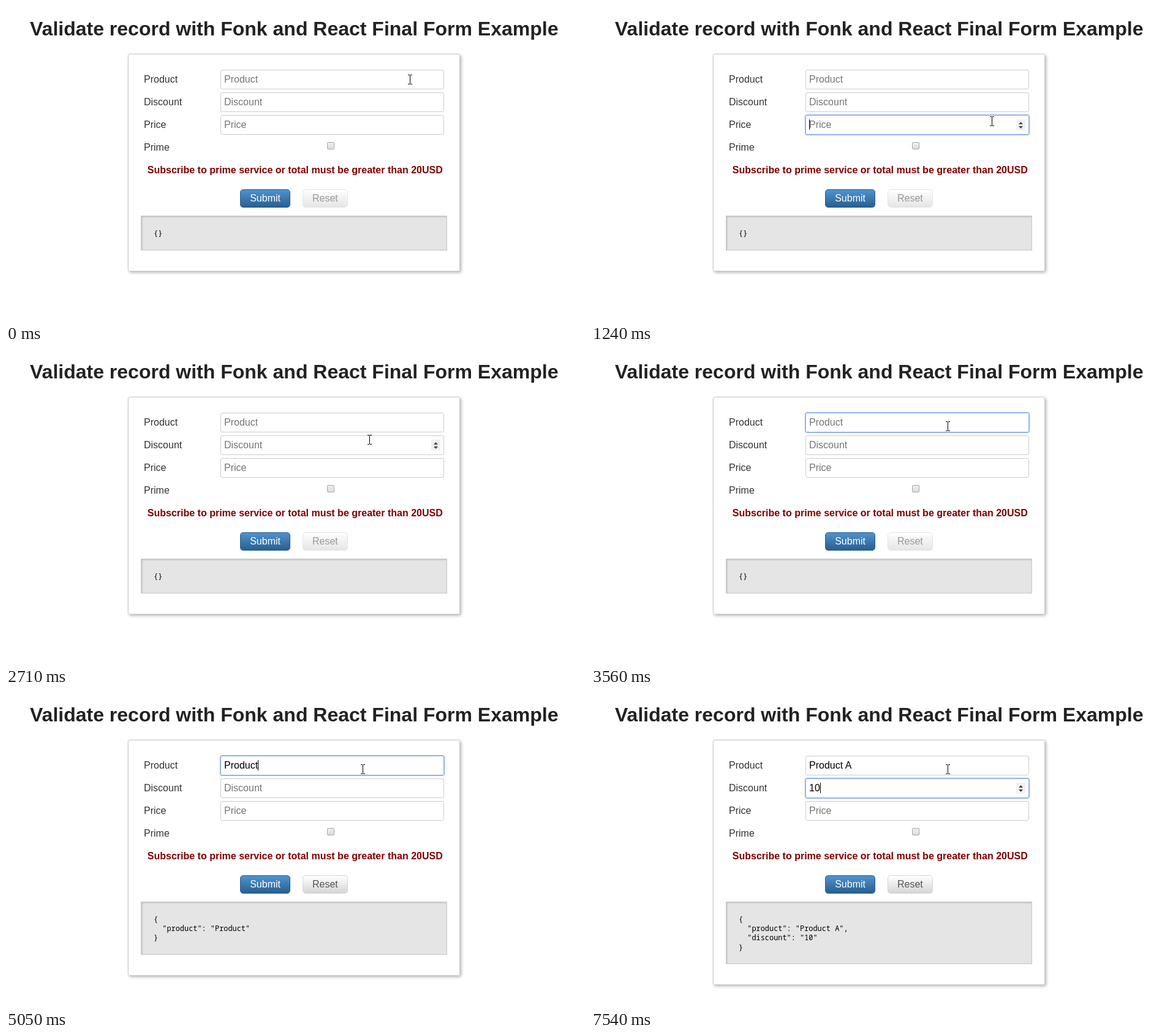
These frames come from a looping animation (945x514 px, 8000 ms). An HTML page:

```html
<!DOCTYPE html>
<html lang="en">
<head>
<meta charset="utf-8">
<title>Form validation</title>
<style>
  html, body { margin: 0; width: 100%; height: 100%; overflow: hidden; background: #fff; }
  body { position: relative; font: 16px/17px "Liberation Sans", Arial, sans-serif; color: #222; }
  body > * { position: absolute; box-sizing: border-box; margin: 0; white-space: pre; }
  h1 { left: 39px; top: 19px; font-size: 32px; line-height: 36px; }
  .form {
    left: 199px; top: 78px; width: 542px; padding: 263px 20px 33px;
    border: 1px solid #ccc; border-radius: 3px; box-shadow: 2px 2px 5px rgba(0,0,0,.3);
  }
  pre {
    margin: 0; padding: 19.9px 20px 19.7px; border: 1px solid #ccc;
    background: #e5e5e5; box-shadow: inset 1px 1px 3px rgba(0,0,0,.2);
    font: 11.92px/15.2px "Noto Sans Mono", monospace; color: #000;
  }
  .label { left: 225px; color: #333; }
  .field {
    left: 350px; width: 365px; height: 32px; padding: 6px 5px;
    border: 1px solid #ccc; border-radius: 3px; color: #000;
  }
  .field.focus { border-color: #98b8f0; box-shadow: 0 0 0 1px #87adec; }
  .field span { color: #757575; }
  .field i { position: absolute; top: 6px; width: 1px; height: 17px; background: #000; }
  .field svg { position: absolute; left: 343px; top: 6px; background: #f0f0f0; display: none; }
  .field.spin svg { display: block; }
  .check {
    left: 524px; top: 222px; width: 12px; height: 12px;
    border: 1px solid #a6a6a6; border-radius: 2px; background: linear-gradient(#eee, #dcdcdc);
  }
  .error { left: 230.8px; top: 259px; font-weight: bold; color: #800000; }
  .btn { top: 299px; height: 30px; padding: 5px 15px; border: 1px solid; border-radius: 5px; }
  .submit { left: 382.2px; color: #fff; border-color: #285f8f; background: linear-gradient(#4f93ce, #285f8f); }
  .reset { left: 484px; color: #555; border-color: #d5d5d5; background: linear-gradient(#fff, #d5d5d5); }
  #cursor { left: 0; top: 0; overflow: visible; }
</style>
</head>
<body>
<h1>Validate record with Fonk and React Final Form Example</h1>
<div class="form"><pre></pre></div>
<div class="check"></div>
<div class="error">Subscribe to prime service or total must be greater than 20USD</div>
<div class="btn submit">Submit</div>
<div class="btn reset">Reset</div>
<svg id="cursor" width="1" height="1" shape-rendering="crispEdges">
  <path d="M-3-8h3v1h-3z M1-8h3v1h-3z M0-7h1v14h-1z M-3 7h3v1h-3z M1 7h3v1h-3z"/>
</svg>
<script>
const LOOP = 8000, TICK = 77, BLINK = 460;
const $ = s => document.querySelector(s);
const names = ['Product', 'Discount', 'Price', 'Prime'];
const rowTop = row => 104 + 37 * row;

const arrows = '<svg width="15" height="18"><path fill="#444" d="M4 8l3.5-4L11 8zM4 11h7l-3.5 4z"/></svg>';
const cursor = $('#cursor');
const fields = [];
names.forEach((name, row) => {
  const add = (cls, top, html) => {
    const el = document.createElement('div');
    el.className = cls;
    el.style.top = top + 'px';
    el.innerHTML = html;
    document.body.insertBefore(el, cursor);
    return el;
  };
  add('label', rowTop(row) + 7, name);
  if (row < 3) {
    const el = add('field', rowTop(row), '<b style="font-weight:normal"></b>' + (row ? arrows : ''));
    fields.push({ el, text: el.firstChild });
  }
});

// Pointer moves, taken in even steps, one per TICK
const moves = [
  { start: 310, steps: 5, x: 656, y: 160 },
  { start: 930, steps: 3, x: 654, y: 188 },
  { start: 1320, steps: 7, x: 627, y: 269 },
  { start: 2400, steps: 5, x: 593, y: 148 },
  { start: 2785, steps: 3, x: 582, y: 126 }
];
// [time, focused row]
const focus = [[0, -1], [310, 0], [780, 1], [1240, 2], [1790, -1], [3030, 0], [6360, 1]];
// Bursts of evenly spaced keystrokes
const bursts = [
  { start: 4040, gap: 168, row: 0, text: 'Product' },
  { start: 5280, gap: 380, row: 0, text: ' A' },
  { start: 7140, gap: 400, row: 1, text: '10' }
];

function pointer(t) {
  let x = 659, y = 120;
  for (const m of moves) {
    if (t < m.start) break;
    const p = Math.min(1, (Math.floor((t - m.start) / TICK) + 1) / m.steps);
    x += (m.x - x) * p;
    y += (m.y - y) * p;
  }
  return [Math.round(x), Math.round(y)];
}

function draw(t) {
  const [x, y] = pointer(t);
  const [focusTime, active] = focus.filter(f => f[0] <= t).pop();

  const values = ['', '', ''];
  let lastInput = focusTime;
  for (const { start, gap, row, text } of bursts) {
    if (t < start) break;
    const count = Math.min(text.length, Math.floor((t - start) / gap) + 1);
    values[row] += text.slice(0, count);
    lastInput = Math.max(lastInput, start + (count - 1) * gap);
  }
  const caretOn = Math.floor((t - lastInput) / BLINK) % 2 === 0;

  cursor.style.transform = `translate(${x}px,${y}px)`;
  fields.forEach(({ el, text }, row) => {
    const focused = row === active;
    const hover = y >= rowTop(row) && y < rowTop(row) + 32;
    el.classList.toggle('focus', focused);
    el.classList.toggle('spin', focused || hover);
    text.innerHTML = values[row] + (focused && caretOn ? '<i></i>' : '') +
      (values[row] ? '' : `<span>${names[row]}</span>`);
  });

  const record = {};
  values.forEach((v, row) => { if (v) record[names[row].toLowerCase()] = v; });
  $('pre').textContent = JSON.stringify(record, null, 2);
  $('.reset').style.opacity = values[0] ? 1 : 0.6;
}

const start = performance.now();
function tick() {
  draw((performance.now() - start) % LOOP);
  requestAnimationFrame(tick);
}
tick();
</script>
</body>
</html>
```
